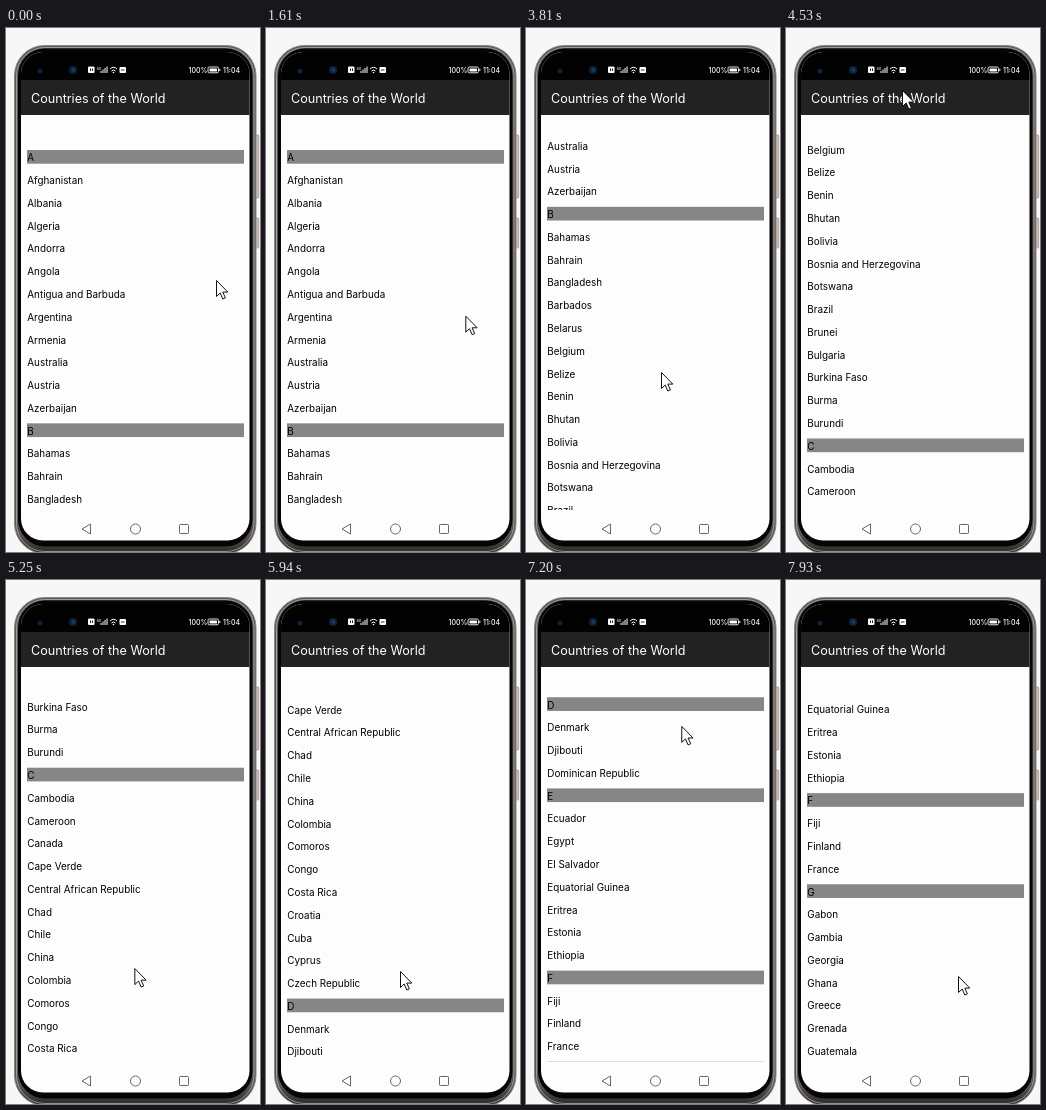
An HTML page that plays this animation: 254 by 524 pixels, repeating every 8 s.

```html
<!DOCTYPE html>
<html lang="en">
<head>
<meta charset="utf-8">
<title>Countries of the World</title>
<style>
html, body { margin: 0; width: 100%; height: 100%; overflow: hidden; background: #f7f7f7; }
svg { display: block; width: 100%; height: 100%; }
text { font-family: Inter, "Noto Sans", sans-serif; font-size: 9.9px; fill: #000; }
.title { font-size: 12.6px; fill: #fff; }
.status { font-size: 7px; font-weight: 500; fill: #fff; }
.nav { fill: none; stroke: #666; }
</style>
</head>
<body>
<svg viewBox="0 0 254 524">
  <defs>
    <linearGradient id="body" x2="0" y2="1">
      <stop offset="0" stop-color="#5a5654"/>
      <stop offset=".96" stop-color="#5a5654"/>
      <stop offset="1" stop-color="#2b2929"/>
    </linearGradient>
    <clipPath id="screen"><rect x="15" y="24" width="228.5" height="488.5" rx="22"/></clipPath>
    <clipPath id="view"><rect x="16" y="111" width="227" height="371"/></clipPath>
  </defs>

  <g fill="#cbbdb7" stroke="#8d827e" stroke-width=".6">
    <rect x="249" y="107" width="3.7" height="63" rx="1"/>
    <rect x="249" y="190" width="3.7" height="30" rx="1"/>
  </g>
  <rect x="8.5" y="17.5" width="241.5" height="508" rx="30" fill="url(#body)" stroke="#8d8785"/>
  <rect x="10.5" y="19.5" width="237.500" height="504" rx="28" fill="none" stroke="#b3adaa" stroke-width=".8"/>
  <rect x="12" y="20.5" width="234.500" height="498" rx="27" fill="#050505"/>

  <g clip-path="url(#screen)">
    <rect x="15" y="24" width="229" height="490" fill="#fdfdfd"/>
    <rect x="15" y="24" width="229" height="28" fill="#020202"/>
    <rect x="15" y="52" width="229" height="35" fill="#222"/>
  </g>

  <g fill="#0b2239">
    <circle cx="34" cy="43" r="2.5"/>
    <circle cx="67" cy="42" r="4"/>
    <circle cx="67.5" cy="42" r="1.8" fill="#17406c"/>
  </g>

  <g fill="#fff">
    <rect x="82" y="38.5" width="6.5" height="6.5" rx="1"/>
    <path d="M84 40.5h1v2.5h-1zM86 40.5h1v2.5h-1z" fill="#222"/>
    <text class="status" x="90.5" y="41.5" style="font-size:3.5px">4G</text>
    <path d="M94.5 45v-2h1v2zM96.5 45v-3.5h1v3.5zM98.500 45v-5h1v5zM100.500 45v-6.500h1v6.500z"/>
    <path d="M104 41q3.500-3.500 7 0M105.500 43q2-2 4 0" fill="none" stroke="#fff"/>
    <circle cx="107.500" cy="44.500" r=".8"/>
    <rect x="113.500" y="39" width="6.500" height="6" rx="1"/>
    <path d="M115 41.500h3.500v1h-3.500z" fill="#333"/>
    <rect x="202" y="39" width="10.500" height="5.800" rx="1.500" fill="none" stroke="#fff" stroke-width=".9"/>
    <rect x="203.500" y="40.400" width="7.500" height="3" rx=".6"/>
    <rect x="213.300" y="40.800" width="1" height="2.200"/>
  </g>
  <text class="status" x="182.500" y="44.500">100%</text>
  <text class="status" x="217" y="44.500">11:04</text>
  <text class="title" x="25" y="75">Countries of the World</text>

  <g clip-path="url(#view)"><g id="list"></g></g>

  <g class="nav">
    <path d="M76 501l8.500-5v10z" stroke-linejoin="round"/>
    <circle cx="129.500" cy="501" r="5"/>
    <rect x="173.500" y="496.500" width="9" height="9" rx=".8"/>
  </g>
  <path id="cursor" d="M.5.5v16l3.700-3.500 2.600 6 2.600-1.100-2.600-5.800h5z" fill="#fff" stroke="#111"/>
</svg>

<script>
const names = ("A,Afghanistan,Albania,Algeria,Andorra,Angola,Antigua and Barbuda,Argentina,Armenia,Australia," +
  "Austria,Azerbaijan,B,Bahamas,Bahrain,Bangladesh,Barbados,Belarus,Belgium,Belize,Benin,Bhutan,Bolivia," +
  "Bosnia and Herzegovina,Botswana,Brazil,Brunei,Bulgaria,Burkina Faso,Burma,Burundi,C,Cambodia,Cameroon," +
  "Canada,Cape Verde,Central African Republic,Chad,Chile,China,Colombia,Comoros,Congo,Costa Rica,Croatia," +
  "Cuba,Cyprus,Czech Republic,D,Denmark,Djibouti,Dominican Republic,E,Ecuador,Egypt,El Salvador," +
  "Equatorial Guinea,Eritrea,Estonia,Ethiopia,F,Fiji,Finland,France,G,Gabon,Gambia,Georgia,Ghana,Greece," +
  "Grenada,Guatemala,Guinea,Guyana").split(",");
const pitch = 22.78, firstRow = 129.8;
const loop = 8000, tick = 150, phase = 30;
const list = document.getElementById("list");
const cursor = document.getElementById("cursor");

list.innerHTML = names.map((name, i) => {
  const y = firstRow + i * pitch;
  const bar = name.length === 1
    ? `<rect x="21" y="${y - 7.8}" width="217" height="13.7" fill="#868686"/>` : "";
  return `${bar}<text x="21.3" y="${y + 3.5}">${name}</text>`;
}).join("");

// Each flick scrolls some rows: start, end, rows
const flicks = [[2880, 3480, 9], [3587, 5916, 26], [6030, 6600, 11], [6840, 7630, 10]];

// Where the pointer turns: time, x, y
const turns = [[1230, 210, 252], [2280, 156, 432], [2880, 165, 394], [3280, 128, 73],
  [3780, 135, 344], [4530, 116, 62], [5400, 132, 485], [5880, 134, 391], [6030, 134, 391],
  [6250, 134, 112], [6630, 134, 300], [7200, 158, 126], [7830, 172, 396]];

const clamp = u => Math.min(1, Math.max(0, u));
const ease = u => u * u * (3 - 2 * u);
const progress = (t, from, to) => ease(clamp((t - from) / (to - from)));

function pointerAt(t) {
  let [start, x, y] = turns[0];
  for (const [end, nextX, nextY] of turns.slice(1)) {
    const p = progress(t, start, end);
    x += (nextX - x) * p;
    y += (nextY - y) * p;
    if (t < end) break;
    start = end;
  }
  return [x, y];
}

function draw(now) {
  const t = Math.floor((now % loop - phase) / tick) * tick + phase;
  const rows = flicks.reduce((sum, [from, to, n]) => sum + n * progress(t, from, to), 0);
  list.setAttribute("transform", `translate(0 ${-rows * pitch})`);
  cursor.setAttribute("transform", `translate(${pointerAt(t)})`);
  requestAnimationFrame(draw);
}
draw(0);
</script>
</body>
</html>
```
